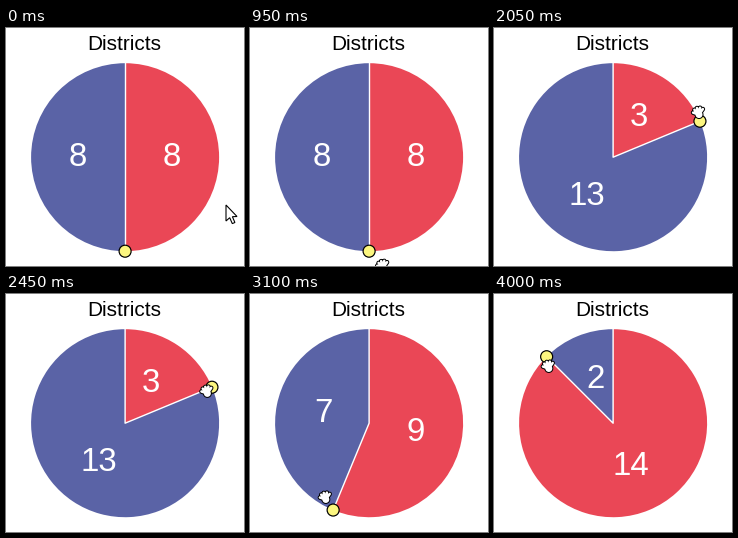
Recreate the animation shown at these times as a matplotlib script. Size 238 by 238 pixels, loop 4.05 s.

```python
import numpy as np
import matplotlib.pyplot as plt
from matplotlib.animation import FuncAnimation
from matplotlib.patches import Circle, Polygon, Wedge

SIZE, DPI = 238, 64
STEP, FRAMES = 50, 81
CX, CY, R = 119.1, 129.2, 94
TOTAL = 16
SLICE = 360 / TOTAL
BLUE, RED, YELLOW = "#5a63a6", "#ea4756", "#fcf67f"
FONT = "Liberation Sans"

ARROW_FROM, ARROW_TO, ARROW_TIME = (220, 177), (138, 216), 600
HAND_START, GRAB = 650, 1350
LAG = 50  # the pie answers the hand this many ms later

# Key points of the hand: time in ms, districts dialled, distance from centre
KEYS = np.array([
    (HAND_START, 7.6, 97), (950, 7.67, 109), (GRAB, 7.67, 109),
    (1600, 6.26, 82), (2050, 2.77, 97), (2300, 1.8, 90), (2750, 5.55, 85),
    (2950, 8.3, 88), (3450, 11.8, 80), (3550, 11.8, 80), (4000, 13.85, 86)])


def px(n):
    return n * 72 / DPI


def polar(deg, radius, cx=CX, cy=CY):
    """Point at a clockwise angle measured from the top."""
    a = np.radians(deg)
    return np.array((cx + radius * np.sin(a), cy - radius * np.cos(a)))


def smooth(u):
    u = np.clip(u, 0, 1)
    return u * u * (3 - 2 * u)


def dial(t):
    """Districts and radius the hand points at."""
    times, turns, radii = KEYS.T
    return np.interp(t, times, turns), np.interp(t, times, radii)


ARROW = np.array([(0, 0), (0, 16), (3.7, 12.7), (6.3, 18.6), (8.9, 17.5),
                  (6.4, 11.7), (11, 11.5)])
PALM = np.array((0, 2.4))
# Thumb and four fingers fan out from the palm
FINGERS = np.vstack([[PALM, polar(a, 6, 0, 1.5), (np.nan, np.nan)]
                     for a in np.linspace(-80, 40, 5)])

fig = plt.figure(figsize=(SIZE / DPI, SIZE / DPI), dpi=DPI, facecolor="white")
ax = fig.add_axes([0, 0, 1, 1])
ax.set(xlim=(0, SIZE), ylim=(SIZE, 0))
ax.axis("off")

ax.text(118.5, 21.7, "Districts", ha="center", va="baseline", color="black",
        family=FONT, size=px(20.8))

red = ax.add_patch(Wedge((CX, CY), R, -90, 90, fc=RED, lw=0))
blue = ax.add_patch(Wedge((CX, CY), R, 90, 270, fc=BLUE, lw=0))
border, = ax.plot([], [], color="white", lw=px(1.4), zorder=2)
labels = [ax.text(0, 0, "", ha="center", va="baseline", color="white",
                  family=FONT, size=px(33), zorder=3) for _ in range(2)]
handle = ax.add_patch(Circle((CX, CY + R), 6, fc=YELLOW, ec="black",
                             lw=px(1.2), zorder=4))
arrow = ax.add_patch(Polygon(ARROW, fc="white", ec="black", lw=px(1.1),
                             zorder=5))

# The hand is a black silhouette with a slimmer white one on top
palms, fingers = [], []
for z, color, grow in ((5, "black", 1), (6, "white", 0)):
    palms.append(ax.add_patch(Circle(PALM, 3.5 + grow, fc=color, lw=0,
                                     zorder=z)))
    fingers += ax.plot([], [], color=color, lw=px(2.6 + 2 * grow), zorder=z,
                       solid_capstyle="round")


def place_cursor(t):
    is_hand = t >= HAND_START
    arrow.set_visible(not is_hand)
    for part in palms + fingers:
        part.set_visible(is_hand)
    turn, radius = dial(t)
    pos = polar(turn * SLICE, radius)
    for palm, finger in zip(palms, fingers):
        palm.center = PALM + pos
        finger.set_data(*(FINGERS + pos).T)
    start, end = np.array(ARROW_FROM), np.array(ARROW_TO)
    arrow.set_xy(ARROW + start + (end - start) * smooth(t / ARROW_TIME))


def draw(i):
    t = i * STEP
    n = int(round(dial(t - LAG)[0]))
    turn = n * SLICE
    red.set_theta2(turn - 90)
    blue.set_theta1(turn - 90)
    border.set_data(*zip(polar(0, R), (CX, CY), polar(turn, R)))
    handle.center = polar(turn, R)
    for label, count, mid in zip(labels, (n, TOTAL - n),
                                 (turn / 2, turn / 2 + 180)):
        x, y = polar(mid, R / 2)
        label.set_position((x, y + 8.3))
        label.set_text(str(count))
    place_cursor(t)
    return [red, blue, border, handle, arrow, *labels, *palms, *fingers]


anim = FuncAnimation(fig, draw, frames=FRAMES, interval=STEP, repeat=True,
                     repeat_delay=0, blit=False)
plt.show()
```
